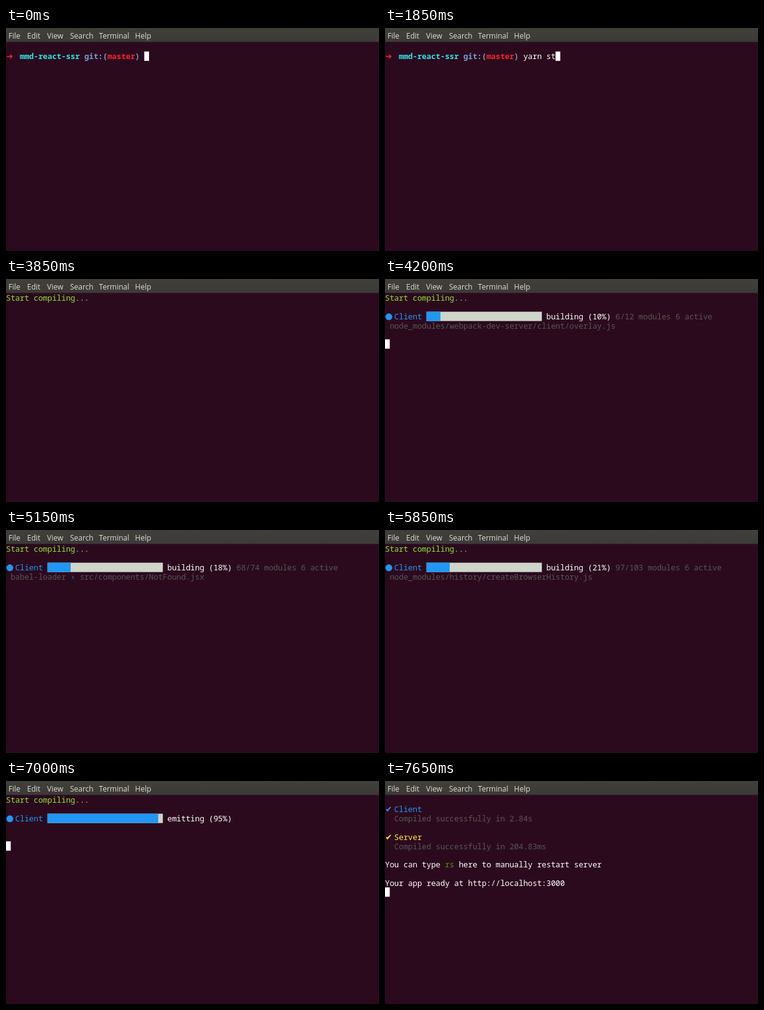
Animation of 600x359 px, one loop 8000 ms. Source, as an HTML page with a canvas:

```html
<!DOCTYPE html>
<html lang="en">
<head>
<meta charset="utf-8">
<title>Terminal</title>
<style>
  html, body { margin: 0; width: 100%; height: 100%; overflow: hidden; background: #2c0a1e; }
  canvas { display: block; width: 600px; height: 359px; }
</style>
</head>
<body>
<canvas id="stage" width="600" height="359"></canvas>
<script>
const ctx = document.getElementById('stage').getContext('2d');
const LOOP = 8000, CW = 7.415, RH = 14.83, TOP = 23.2, BLINK = 600;
const MONO = '12.6px "Noto Sans Mono", "DejaVu Sans Mono", monospace';
const SYMBOL = '13px "DejaVu Sans", sans-serif';
const C = {
  bg: '#2c0a1e', label: '#dfdbd2', white: '#ffffff',
  red: '#ef2929', cyan: '#34e2e2', steel: '#729fcf', blue: '#2196f3',
  gray: '#555753', lime: '#8ae234', green: '#4e9a06', yellow: '#ffeb3b',
  track: '#cdd6c9', sep: '#1f7ccb'
};

const menu = [['File', 4], ['Edit', 34], ['View', 66], ['Search', 103], ['Terminal', 149.6], ['Help', 207.6]];
const menuFill = ctx.createLinearGradient(0, 0, 0, 22);
menuFill.addColorStop(0, '#403f3a');
menuFill.addColorStop(1, '#3c3b37');

const command = 'yarn start';
const keyTimes = [400, 750, 1350, 1400, 1600, 1750, 1850, 2000, 2050, 2250];
const ENTER = 2850, CLEAR = 3850, DONE = 7050;

// time, percent, built modules, all modules, current file
const builds = [
  [3950, 10, 0, 1, ''],
  [4000, 10, 1, 3, 'babel-loader › src/client.jsx'],
  [4100, 10, 3, 9, 'node_modules/webpack-dev-server/client/index.js'],
  [4200, 10, 6, 12, 'node_modules/webpack-dev-server/client/overlay.js'],
  [4600, 10, 8, 14, 'node_modules/webpack/hot/emitter.js'],
  [4650, 11, 13, 19, 'node_modules/react-dom/index.js'],
  [4700, 12, 21, 27, 'node_modules/url/url.js'],
  [4800, 13, 29, 35, 'babel-loader › src/components/App.jsx'],
  [4850, 14, 37, 43, 'css-loader › postcss-loader › sass-loader › src/components/Header/Header.scss'],
  [4900, 15, 45, 51, 'node_modules/html-entities/index.js'],
  [5000, 16, 52, 58, 'node_modules/react-router-dom/Link.js'],
  [5050, 17, 60, 66, 'babel-loader › src/components/Home.jsx'],
  [5150, 18, 68, 74, 'babel-loader › src/components/NotFound.jsx'],
  [5200, 20, 86, 92, 'node_modules/react-router-dom/Switch.js'],
  [5250, 21, 94, 100, 'node_modules/react-router-dom/withRouter.js'],
  [5450, 21, 95, 101, 'node_modules/react-dom/cjs/react-dom.development.js'],
  [5550, 21, 96, 102, 'node_modules/react-router-dom/node_modules/react-router/Route.js'],
  [5850, 21, 97, 103, 'node_modules/history/createBrowserHistory.js'],
  [6050, 22, 98, 104, 'node_modules/react-router-dom/node_modules/react-router/Link.js'],
  [6200, 22, 99, 105, 'node_modules/history/PathUtils.js'],
  [6600, 22, 127, 128, 'node_modules/history/DOMUtils.js'],
  [6650, 40, 128, 128, '']
];

const phases = [
  [6800, 70, 'chunk optimization'],
  [6850, 91, 'additional chunk assets processing'],
  [6900, 92, 'chunk asset optimization'],
  [6950, 95, 'emitting']
];

const latest = (list, t) => list.filter(item => t >= item[0]).pop();
const rowY = row => TOP + row * RH;
const baseline = row => Math.round(rowY(row) + 12.2);

function text(row, col, str, color, bold) {
  ctx.font = (bold ? 'bold ' : '') + MONO;
  ctx.fillStyle = color;
  [...str].forEach((ch, i) => {
    if (ch !== ' ') ctx.fillText(ch, (col + i) * CW, baseline(row));
  });
}

function symbol(row, ch, color) {
  ctx.font = SYMBOL;
  ctx.fillStyle = color;
  ctx.fillText(ch, 0.4, baseline(row));
}

function block(row, col, cols, color) {
  ctx.fillStyle = color;
  ctx.fillRect(col * CW, rowY(row) - 0.2, cols * CW + 0.2, RH + 0.2);
}

function drawMenu() {
  ctx.fillStyle = menuFill;
  ctx.fillRect(0, 0, 600, 22.4);
  ctx.fillStyle = C.label;
  ctx.font = '12px "Open Sans", "Noto Sans", sans-serif';
  menu.forEach(([label, x]) => ctx.fillText(label, x, 17));
}

function drawPrompt(t) {
  symbol(1, '➜', C.red);
  text(1, 3, 'mmd-react-ssr', C.cyan, true);
  text(1, 17, 'git:(', C.steel, true);
  text(1, 22, 'master', C.red, true);
  text(1, 28, ')', C.steel, true);
  const typed = keyTimes.filter(k => t >= k).length;
  text(1, 30, command.slice(0, typed), C.white);
  if (t >= 3000) text(2, 0, 'yarn run v1.9.4', C.white, true);
  if (t >= 3050) text(3, 0, '$ node scripts/start.js', C.gray);
  if (t < ENTER) return [1, 30 + typed];
  return [t < 3000 ? 2 : t < 3050 ? 3 : 4, 0];
}

function drawBar(percent, label) {
  ctx.fillStyle = C.blue;
  ctx.beginPath();
  ctx.arc(6.2, rowY(2) + 8, 5.5, 0, Math.PI * 2);
  ctx.fill();
  text(2, 2, 'Client', C.blue);
  block(2, 9, 25, C.track);
  block(2, 9, Math.round(percent / 4), C.blue);
  text(2, 35, `${label} (${percent}%)`, C.white);
}

function drawBuild(t) {
  text(0, 0, 'Start compiling...', C.lime);
  const phase = latest(phases, t), build = latest(builds, t);
  if (phase) {
    drawBar(phase[1], phase[2]);
  } else if (build) {
    const [, percent, built, total, file] = build;
    drawBar(percent, 'building');
    text(2, 50, `${built}/${total} modules ${total - built} active`, C.gray);
    text(3, 1, file.replace(/›/g, ' '), C.gray);
    text(3, 1, file.replace(/[^›]/g, ' '), C.sep);
  }
  return [build ? 5 : 1, 0];
}

function drawResult(row, name, time, color) {
  symbol(row, '✔', color);
  text(row, 2, name, color);
  text(row + 1, 2, 'Compiled successfully in ' + time, C.gray);
}

function drawDone(t) {
  drawResult(1, 'Client', '2.84s', C.blue);
  if (t >= 7100) drawResult(4, 'Server', '204.83ms', C.yellow);
  if (t >= 7200) {
    text(7, 0, 'You can type    here to manually restart server', C.white);
    text(7, 13, 'rs', C.green);
  }
  if (t >= 7350) text(9, 0, 'Your app ready at http://localhost:3000', C.white);
  return [10, 0];
}

function draw(t) {
  ctx.fillStyle = C.bg;
  ctx.fillRect(0, 0, 600, 359);
  drawMenu();
  const scene = t < CLEAR ? drawPrompt : t < DONE ? drawBuild : drawDone;
  const [row, col] = scene(t);
  const visible = t < ENTER || Math.floor((t - ENTER) / BLINK) % 2 === 0;
  if (visible) block(row, col, 1, C.white);
}

const start = performance.now();
function tick() {
  draw((performance.now() - start) % LOOP);
  requestAnimationFrame(tick);
}
tick();
</script>
</body>
</html>
```
